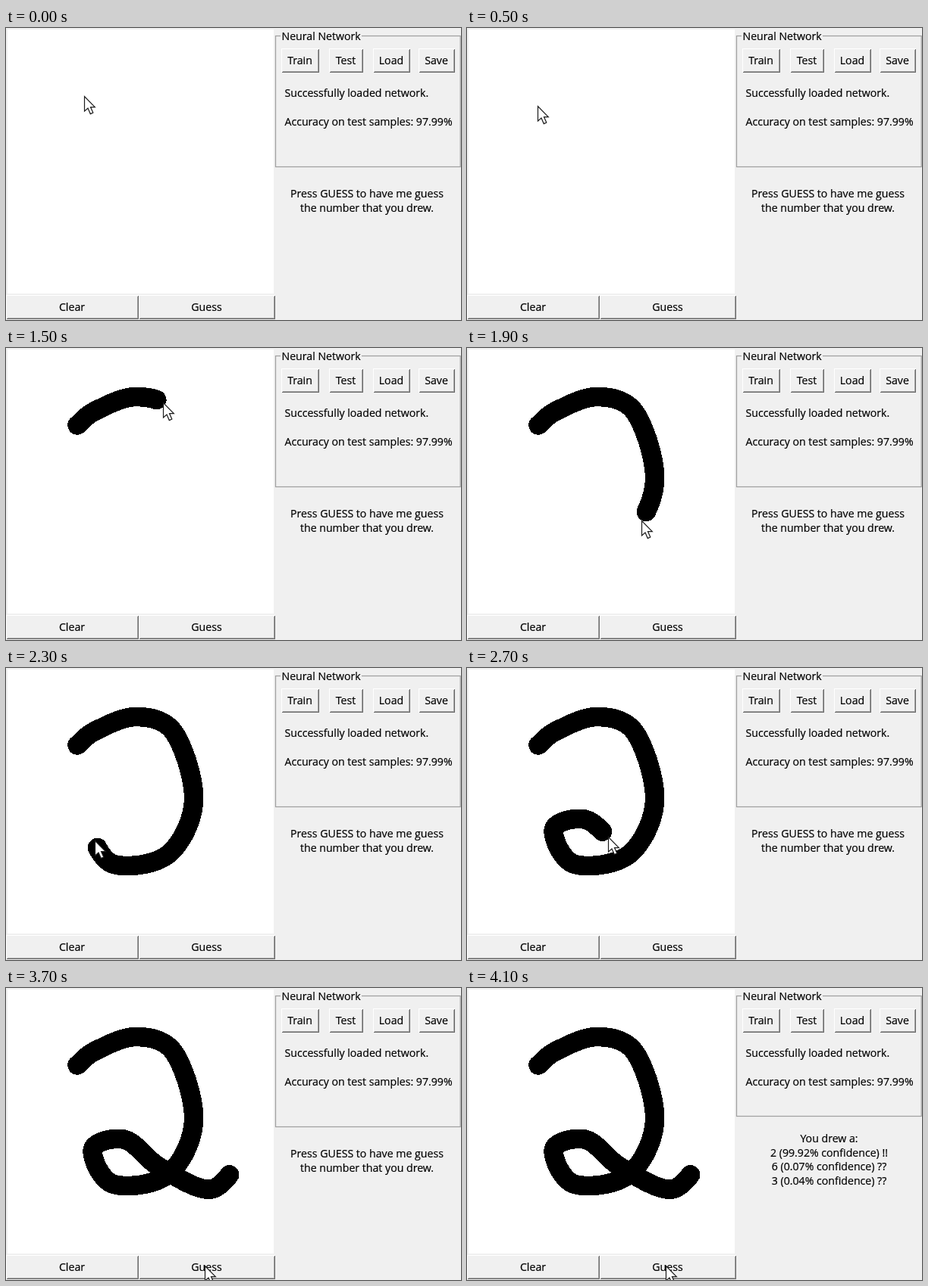
These frames come from a looping animation (600 px wide and 386 px high, 5600 ms). An HTML page:

```html
<!DOCTYPE html>
<html lang="en">
<head>
<meta charset="utf-8">
<title>Digit recognizer</title>
<style>
  html, body { margin: 0; width: 100%; height: 100%; overflow: hidden; background: #f0f0f0; }
  svg { display: block; width: 600px; height: 386px; }
  text { font: 14.15px "Open Sans", "Noto Sans", sans-serif; stroke: #000; stroke-width: .2px; }
  .mid { text-anchor: middle; }
  .crisp { shape-rendering: crispEdges; }
</style>
</head>
<body>
<svg viewBox="0 0 600 386" xmlns="http://www.w3.org/2000/svg">
  <rect width="600" height="386" fill="#f0f0f0"/>
  <rect x="2" y="2" width="351" height="349" fill="#fff"/>
  <path id="ink" class="crisp" fill="none" stroke="#000" stroke-width="25.6" stroke-linecap="round" stroke-linejoin="round"/>
  <rect id="groove" x="355.5" y="10.5" width="243.7" fill="none" stroke="#a0a0a0" stroke-width="1.25"/>
  <rect x="362" y="4" width="107" height="14" fill="#f0f0f0"/>
  <text x="363.5" y="16">Neural Network</text>
  <g id="buttons" class="mid"></g>
  <text x="367.5" y="91">Successfully loaded network.</text>
  <text x="367.5" y="129">Accuracy on test samples: 97.99%</text>
  <g id="message" class="mid"></g>
  <path id="cursor" d="M.5 .5V20L5 16L8.3 23.6L11.8 22L8.5 14.6H14.3Z" fill="#fff" stroke="#1c1c1c" stroke-width="1.2"/>
</svg>
<script>
const LOOP = 5600, STEP = 100;
const DRAW_START = 1100, DRAW_END = 3100, PRESS = 3800, RESULT = 4000;
const CURSOR_LEAD = 0.16;

// The pen passes one key point every two steps; it lifts before the last.
const PEN = [
  [94, 102], [118, 83], [172, 64.5], [222, 86], [247.5, 176], [213, 247],
  [141, 259], [114.5, 213], [157, 200.5], [203, 237], [270, 266], [311, 224]
];
const PROMPT = ["Press GUESS to have me guess", "the number that you drew."];
const GUESSES = [
  "You drew a:", "2 (99.92% confidence) !!", "6 (0.07% confidence) ??", "3 (0.04% confidence) ??"
];

const el = id => document.getElementById(id);
const lines = (texts, x, y) =>
  texts.map((text, i) => `<text x="${x}" y="${y + i * 18.5}">${text}</text>`).join("");

function button(text, x, y, w, pressed) {
  const h = 32, shift = pressed ? 1 : 0;
  const edge = (inset, color, lit) => {
    const l = x + 0.5 + inset, t = y + 0.5 + inset;
    const r = x + w - 0.5 - inset, b = y + h - 0.5 - inset;
    return `<path d="M${l} ${b}${lit ? `V${t}H${r}` : `H${r}V${t}`}" stroke="${color}"/>`;
  };
  return `<g class="crisp" fill="none">
    ${edge(0, pressed ? "#696969" : "#fff", true)}
    ${edge(1, pressed ? "#e3e3e3" : "#a0a0a0", false)}
    ${edge(0, pressed ? "#fff" : "#696969", false)}</g>
    <text x="${x + w / 2 - 0.5 + shift}" y="${y + 21.2 + shift}">${text}</text>`;
}

function buttons(pressed) {
  const widths = { Train: 50, Test: 45, Load: 49, Save: 48 };
  const top = Object.entries(widths).map(([text, w], i) =>
    button(text, Math.round(388 + 60 * i - w / 2), 27, w));
  return top.join("") + button("Clear", 0, 353, 175) + button("Guess", 175, 353, 180, pressed);
}

// Catmull-Rom position along the pen points.
function penAt(s) {
  const last = PEN.length - 1;
  const i = Math.min(Math.floor(s), last - 1), u = s - i;
  const [a, b, c, d] = [-1, 0, 1, 2].map(k => PEN[Math.max(0, Math.min(last, i + k))]);
  return [0, 1].map(k => b[k] + u / 2 * (c[k] - a[k]
    + u * (2 * a[k] - 5 * b[k] + 4 * c[k] - d[k]
    + u * (3 * (b[k] - c[k]) + d[k] - a[k]))));
}

const penProgress = t => (Math.min(t, DRAW_END) - DRAW_START + STEP) / (2 * STEP);

function inkPath(t) {
  if (t < DRAW_START) return "";
  const count = Math.round(penProgress(t) * 20);
  return "M" + Array.from({ length: count + 1 }, (_, i) => penAt(i / 20)).join("L");
}

// Decelerating move between two points.
function glide(t, start, duration, from, to) {
  const p = Math.max(0, Math.min(1, (t - start) / duration));
  const eased = 1 - (1 - p) ** 2;
  return from.map((v, k) => Math.round(v + (to[k] - v) * eased));
}

function cursorAt(t) {
  if (t < DRAW_START) return glide(t, 200, 500, [103, 90], [91, 105]);
  if (t < DRAW_END) return penAt(penProgress(t) + CURSOR_LEAD).map(Math.round);
  return glide(t, DRAW_END, 500, [297, 239], [262, 367]);
}

function render(t) {
  const done = t >= RESULT;
  el("ink").setAttribute("d", inkPath(t));
  el("cursor").setAttribute("transform", `translate(${cursorAt(t)})`);
  el("groove").setAttribute("height", done ? 159 : 173);
  el("message").innerHTML = done ? lines(GUESSES, 477.5, 204) : lines(PROMPT, 476, 224);
  el("buttons").innerHTML = buttons(t >= PRESS && !done);
}

const start = performance.now();
let shown = -1;
function tick() {
  const elapsed = (performance.now() - start) % LOOP;
  const t = Math.floor(elapsed / STEP) * STEP;
  if (t !== shown) render(shown = t);
  requestAnimationFrame(tick);
}
tick();
</script>
</body>
</html>
```
